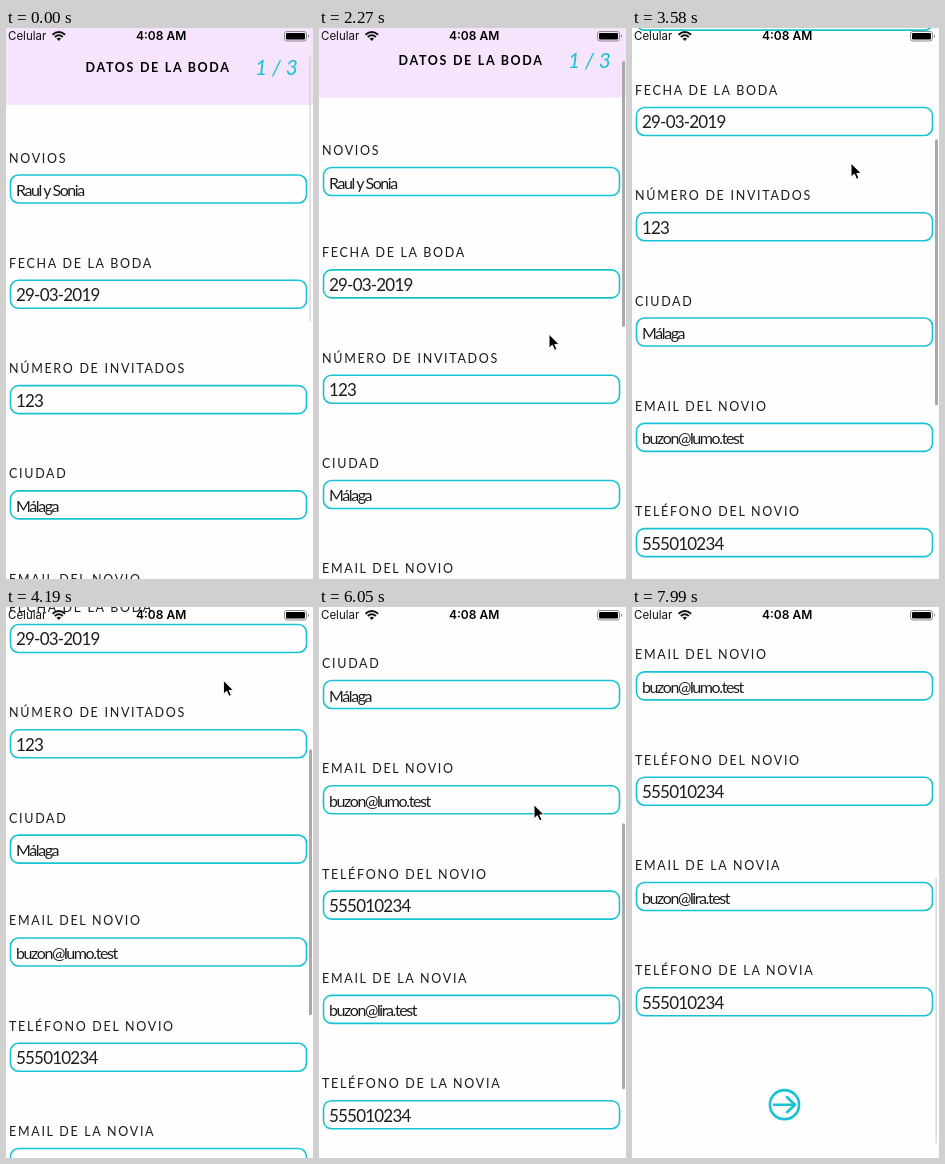
Animation, 307 px wide and 551 px high, one loop 8.45 s. Source, as an HTML page:

```html
<!DOCTYPE html>
<html lang="es">
<head>
<meta charset="utf-8">
<title>Datos de la boda</title>
<style>
  html, body { margin: 0; width: 100%; height: 100%; overflow: hidden; background: #fefefe; }
  svg { display: block; }
  text { font-family: Lato, "Open Sans", sans-serif; fill: #1c1c1c; white-space: pre; }
  .label { font-size: 12.5px; letter-spacing: 1.7px; }
  .title { font-weight: 700; fill: #000; }
  .value { font-size: 16px; letter-spacing: -1.4px; }
  .digits { font-size: 17px; letter-spacing: -0.8px; }
  .step { font-size: 21px; fill: #17c3d3; font-style: italic; }
  .status { font-family: Inter, "Liberation Sans", sans-serif; font-size: 11.5px; fill: #111; }
  .clock { font-size: 12px; font-weight: 600; fill: #000; }
  .line { fill: none; stroke: #17c3d3; }
</style>
</head>
<body>
<svg width="307" height="551" viewBox="0 0 307 551">
  <defs>
    <g id="page">
      <rect width="307" height="77" y="0" fill="#f6e4fd"/>
      <text class="label title" x="79.5" y="44">DATOS DE LA BODA</text>
      <text class="step" x="249" y="47">1 / 3</text>
      <g id="fields"></g>
      <g class="line" stroke-width="2.6" stroke-linecap="round" stroke-linejoin="round">
        <circle cx="152.5" cy="1001" r="14.6"/>
        <path d="M142 1001H163M155 993.500L163 1001L155 1008.500"/>
      </g>
    </g>
    <clipPath id="upper"><rect id="upperBox" width="307" height="250"/></clipPath>
    <clipPath id="lower"><rect id="lowerBox" width="307" height="551" y="250"/></clipPath>
  </defs>

  <rect width="307" height="551" fill="#fefefe"/>
  <g clip-path="url(#upper)"><use id="pageTop" href="#page"/></g>
  <g clip-path="url(#lower)"><use id="pageBottom" href="#page"/></g>
  <rect id="bar" height="266" rx="1.5"/>

  <text class="status" x="2" y="12">Celular</text>
  <g fill="none" stroke="#111" stroke-width="2">
    <path d="M46.500 6.700Q52.800 1.200 59.100 6.700M48.800 9.100Q52.800 5.500 56.800 9.100"/>
    <path d="M52.800 13L50.500 10.600Q52.800 8.800 55.100 10.600Z" fill="#111" stroke="none"/>
  </g>
  <text class="status clock" x="130" y="12.300">4:08 AM</text>
  <rect x="278.500" y="3.500" width="22" height="9.500" rx="2.500" fill="none" stroke="#8b8b8b"/>
  <rect x="280" y="5" width="19" height="6.500" rx="1.200"/>
  <path d="M302 6.500Q304 8.200 302 10Z" fill="#777"/>

  <path id="cursor" d="M0 0V14L3.300 11L5.600 16.200L8 15.100L5.800 10.200H10.200Z"
        fill="#000" stroke="#fff" stroke-width="1"/>
</svg>

<script>
const LOOP = 8450;
const FIRST_MOVE = 340;
const TICK = 77.1;
const PITCH = 105.3;
const $ = id => document.getElementById(id);

const fields = [
  ["NOVIOS", "Raul y Sonia"],
  ["FECHA DE LA BODA", "29-03-2019"],
  ["NÚMERO DE INVITADOS", "123"],
  ["CIUDAD", "Málaga"],
  ["EMAIL DEL NOVIO", "buzon@lumo.test"],
  ["TELÉFONO DEL NOVIO", "555010234"],
  ["EMAIL DE LA NOVIA", "buzon@lira.test"],
  ["TELÉFONO DE LA NOVIA", "555010234"]
];

$("fields").innerHTML = fields.map(([label, value], i) => {
  const kind = /^[\d-]+$/.test(value) ? "value digits" : "value";
  return `<g transform="translate(0 ${(i * PITCH).toFixed(1)})">
    <text class="label" x="3" y="134.500">${label}</text>
    <rect class="line" x="4.500" y="147" width="296" height="28" rx="8" stroke-width="1.6"/>
    <text class="${kind}" x="10" y="168">${value}</text></g>`;
}).join("");

// time, scroll, extra scroll below the tear, tear height
const scrollKeys = [
  [0, 0, 0, 200], [1960, 0, 0, 200], [2270, 7.5, 3, 200], [2730, 66, 6, 230],
  [3200, 138, 5, 240], [3580, 173, 0, 250], [4250, 250, 3, 260], [4600, 266, 0, 270],
  [4950, 268, 0, 270], [5280, 286.5, 5, 270], [6050, 390, 1, 330],
  [6590, 460.5, 9.5, 265], [6970, 503.3, 0, 265]
];

// time, x, y
const cursorKeys = [
  [340, 238, 503], [800, 218, 334], [950, 223, 330], [1260, 224, 330], [1570, 229, 332],
  [1960, 230, 330], [2270, 230, 306], [2730, 226, 242], [3200, 221, 170], [3580, 219, 135],
  [4250, 217, 58], [4400, 217, 58], [4850, 214, 323], [4950, 214, 322], [5280, 215, 304],
  [6050, 215, 197], [6590, 216, 119], [6970, 215, 78], [7430, 215, 78], [7990, 275, 549]
];

function sample(keys, t) {
  const i = keys.findIndex(k => k[0] > t);
  if (i === 0) return keys[0].slice(1);
  if (i < 0) return keys[keys.length - 1].slice(1);
  const a = keys[i - 1], b = keys[i];
  const p = (t - a[0]) / (b[0] - a[0]);
  return a.slice(1).map((v, n) => v + (b[n + 1] - v) * p);
}

function setAttrs(el, attrs) {
  for (const name in attrs) el.setAttribute(name, attrs[name]);
}

function draw(time) {
  const t = time < FIRST_MOVE ? 0
    : FIRST_MOVE + Math.floor((time - FIRST_MOVE) / TICK) * TICK;

  const [scroll, lag, split] = sample(scrollKeys, t);
  setAttrs($("upperBox"), { height: split });
  setAttrs($("lowerBox"), { y: split });
  setAttrs($("pageTop"), { y: -scroll });
  setAttrs($("pageBottom"), { y: -scroll - lag });

  const active = t >= 1960 && t < 7430;
  setAttrs($("bar"), {
    x: active ? 303 : 303.5,
    y: 28 + (scroll + lag) * 0.482,
    width: active ? 3 : 1.2,
    fill: active ? "#a9a9a9" : "#cfcfcf"
  });

  const [x, y] = sample(cursorKeys, t);
  setAttrs($("cursor"), {
    transform: `translate(${x} ${y})`,
    visibility: time >= FIRST_MOVE && time < 7970 ? "visible" : "hidden"
  });
}

const start = performance.now();
function loop() {
  draw((performance.now() - start) % LOOP);
  requestAnimationFrame(loop);
}
loop();
</script>
</body>
</html>
```
